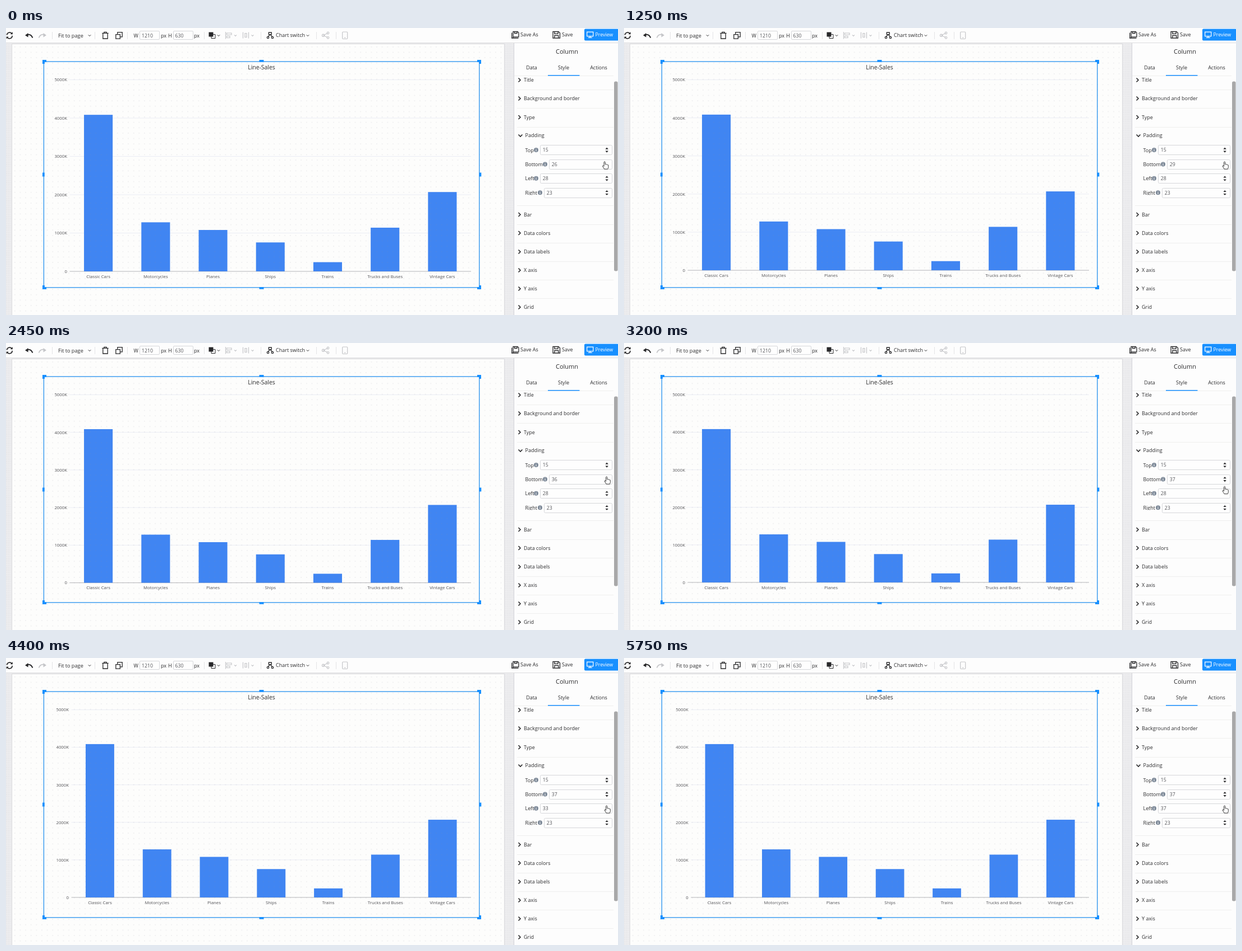
Recreate the animation shown at these times as an HTML page. Size 1091 by 513 pixels, loop 5800 ms.

```html
<!DOCTYPE html>
<html lang="en">
<head>
<meta charset="utf-8">
<title>Chart padding editor</title>
<style>
  html, body { margin: 0; width: 100%; height: 100%; overflow: hidden; background: #fdfdfd; }
  svg { display: block; width: 1091px; height: 513px; font: 9px "Open Sans", "Noto Sans", sans-serif; }
  text { fill: #2c2c2e; }
  .axis { font-size: 7.8px; fill: #535357; }
  .value { font-size: 8.7px; fill: #55565a; }
  .field { fill: #fefefe; stroke: #d6d7da; }
  .icon { fill: none; stroke: #28282a; stroke-width: 1.3; }
  .off { fill: none; stroke: #c5c6c9; stroke-width: 1.2; }
  .rule { stroke: #efefee; }
  .mid { text-anchor: middle; }
  .end { text-anchor: end; }
</style>
</head>
<body>
<svg viewBox="0 0 1091 513" xmlns="http://www.w3.org/2000/svg">
  <defs>
    <pattern id="dots" x="11" y="29" width="9.63" height="9.63" patternUnits="userSpaceOnUse">
      <circle cx="4.8" cy="4.8" r=".65" fill="#8a8a98" fill-opacity=".3"/>
    </pattern>
    <pattern id="mesh" width="3.2" height="3.2" patternUnits="userSpaceOnUse">
      <rect width="3.2" height="3.2" fill="#eeeef0"/>
      <rect width="1.6" height="1.6" fill="#e2e2e5"/>
    </pattern>
    <clipPath id="fold"><path d="M906 200H1091V298.5H906Z"/></clipPath>
  </defs>

  <!-- canvas and page -->
  <rect y="27" width="906" height="486" fill="url(#mesh)"/>
  <rect x="10" y="28" width="879" height="490" fill="#d9d9dc"/>
  <rect x="11" y="29" width="877" height="490" fill="#fdfdfc"/>
  <g id="chart"></g>
  <rect x="11" y="29" width="877" height="490" fill="url(#dots)"/>
  <text class="mid" x="455.5" y="74" style="font-size:10.4px">Line-Sales</text>
  <rect x="67.4" y="60" width="776.4" height="403.9" fill="none" stroke="#2490ee" stroke-width="1.3"/>
  <g id="handles" fill="#1890ff"></g>

  <!-- toolbar -->
  <rect width="1091" height="26.5" fill="#fdfdfd"/>
  <path d="M0 26.5H1091" stroke="#dcdcde"/>
  <g class="icon">
    <path d="M1.6 12.5A4.8 4.8 0 0 1 10 9.6M11 13.7A4.8 4.8 0 0 1 2.4 17" stroke-width="1.7"/>
    <path d="M11.8 7V11.2H7.8ZM.7 19.6V15.4H4.7Z" fill="#28282a" stroke="none"/>
    <path d="M37 12.5Q44 9.5 47.5 17.5" stroke-width="2"/>
    <path d="M34 13L39.5 9V16.5Z" fill="#28282a" stroke="none"/>
    <path d="M171.3 9.3H182.7M174.8 9V7.4H179.2V9M172.8 9.5V19H181.2V9.5"/>
    <path d="M195.8 11.6H203.4V19.2H195.8ZM198.8 11.3V7.6H207.2V15.8H203.6"/>
    <path d="M366 11.5H373V18.5H366Z" stroke-width="1"/>
    <rect x="361.5" y="7.5" width="8" height="8" fill="#28282a" stroke="none"/>
    <path d="M468.3 8H473.3V11.6H468.3ZM470.8 11.6L467.2 15.5M470.8 11.6L474.7 15.5"/>
    <circle cx="467" cy="17" r="1.7"/><circle cx="475" cy="17" r="1.7"/>
    <path d="M904 8.5V18H913.5M904 6.5H912L914 8.5V15.8H904ZM906.5 6.5V9.5H911V6.5M901.7 8.5V18H912"/>
    <path d="M975 6.5H985L987.5 9V18H975ZM977.8 6.5V10.3H984V6.5M977.8 18V13.5H984.8V18"/>
  </g>
  <g class="off">
    <path d="M69 12.5Q62 9.5 58.5 17.5" stroke-width="1.8"/>
    <path d="M72 13L66.5 9V16.5Z" fill="#c5c6c9" stroke="none"/>
    <path d="M391.5 7V19.5M393.5 9H402V12H393.5ZM393.5 14.5H399V17.5H393.5Z"/>
    <path d="M422.5 7.5V18.5M432.5 7.5V18.5M426 9.5H429V16.5H426Z"/>
    <path d="M566 13L573.5 9.3M566 13.3L573.5 17"/>
    <circle cx="565.5" cy="13.2" r="2"/><circle cx="574" cy="9" r="1.8"/><circle cx="574" cy="17.3" r="1.8"/>
    <rect x="599.7" y="7" width="9" height="12.5" rx="1.2"/><path d="M603 17.3H605.5"/>
  </g>
  <path d="M82.5 7V20M158.5 7V20M216.5 7V20M353.5 7V20M454.5 7V20M553.5 7V20M588.5 7V20" stroke="#e4e4e6"/>
  <path id="carets" class="icon" style="stroke-width:1"/>
  <path d="M407 12.3L409 14.3L411 12.3M437.5 12.3L439.5 14.3L441.5 12.3" class="off"/>
  <rect class="field" x="238.5" y="5.5" width="35" height="15" rx="1.5"/>
  <rect class="field" x="298.5" y="5.5" width="35" height="15" rx="1.5"/>
  <text x="93" y="16.5" style="font-size:9.2px">Fit to page</text>
  <text x="227.5" y="16.5">W</text><text class="value" x="242" y="16.5">1210</text><text x="276" y="16.5">px</text>
  <text x="289" y="16.5">H</text><text class="value" x="301.5" y="16.5">630</text><text x="335" y="16.5">px</text>
  <text x="481" y="16.3">Chart switch</text>
  <text x="917" y="15.3">Save As</text>
  <text x="991" y="15.3">Save</text>
  <rect x="1031" y="1.5" width="61" height="21" rx="2" fill="#1890ff"/>
  <path d="M1035.7 7.2H1046.8V14.7H1035.7ZM1041.2 14.7V17M1037.8 17.2H1044.8" fill="none" stroke="#fff" stroke-width="1.2"/>
  <text x="1050.5" y="15.3" style="fill:#fff;font-size:8.8px">Preview</text>

  <!-- side panel -->
  <rect x="905" y="27" width="186" height="486" fill="#fdfdfd"/>
  <path d="M905.5 27V513" stroke="#cfcfd6"/>
  <text class="mid" x="1000" y="46" style="font-size:11px">Column</text>
  <text class="mid" x="937" y="73.7">Data</text>
  <text class="mid" x="994" y="73.7">Style</text>
  <text class="mid" x="1056.5" y="73.7">Actions</text>
  <path class="rule" d="M906 85.5H1083"/>
  <path d="M966 84.8H1022.5" stroke="#1890ff" stroke-width="1.4"/>
  <g id="panel"></g>
  <g id="fields"></g>
  <rect x="1084" y="95.5" width="6.5" height="339" rx="2.5" fill="#a8a8a9"/>

  <path id="cursor" fill="#fff" stroke="#222" stroke-width=".9" stroke-linejoin="round"
    d="M-2.8 2V-5.6Q-1.7 -7.6 -.6 -5.6V-1.4Q.6 -2.4 1.5 -1.1Q2.7 -2 3.4 -.6Q5 -1.1 5 .8V3.4Q5 5.2 3.8 7H-2.2Q-3.2 4.7 -5 2.7Q-6 .9 -4.4 .8Z"/>
</svg>
<script>
const $ = id => document.getElementById(id);
const LOOP = 5800;

function add(parent, tag, attrs, text) {
  const el = document.createElementNS('http://www.w3.org/2000/svg', tag);
  for (const key in attrs) el.setAttribute(key, attrs[key]);
  if (text !== undefined) el.textContent = text;
  return parent.appendChild(el);
}
const set = (el, attrs) => { for (const key in attrs) el.setAttribute(key, attrs[key]); };

// Static repeats
$('carets').setAttribute('d', [149, 379, 538].map(x => `M${x - 2.2} 12.3l2.2 2.2l2.2 -2.2`).join(''));

for (const [x, sx] of [[65, 1], [847, -1]])
  for (const [y, sy] of [[57, 1], [467, -1]])
    add($('handles'), 'path', { d: 'M0 0H7V4H4V7H0Z', transform: `translate(${x} ${y}) scale(${sx} ${sy})` });
for (const [x, y, w, h] of [[451.5, 57, 8, 3.8], [451.5, 463, 8, 3.8], [65, 258.5, 3.8, 7], [843.5, 258.5, 3.8, 7]])
  add($('handles'), 'rect', { x, y, width: w, height: h });

const sections = [['Title', 93], ['Background and border', 126], ['Type', 159.5], ['Padding', 192], ['Bar', 333.5],
  ['Data colors', 366.5], ['Data labels', 400], ['X axis', 433], ['Y axis', 466], ['Grid', 499]];
for (const [name, y] of sections) {
  const open = name === 'Padding';
  add($('panel'), 'path', {
    d: open ? `M913.5 ${y - 1.5}l3.5 3.5l3.5 -3.5` : `M913.5 ${y - 3.5}l3.5 3.5l-3.5 3.5`,
    class: 'icon', style: 'stroke-width:1.6'
  });
  add($('panel'), 'text', { x: open ? 925.5 : 923, y: y + 3.2 }, name);
  add($('panel'), 'path', { class: 'rule', d: `M911 ${open ? 317.5 : Math.round(y + 17) + .5}H1083` });
}

const rows = [['Top', 218.2, 952.5, 15], ['Bottom', 243.7, 968.5, 26], ['Left', 269, 952.5, 28], ['Right', 294.5, 959.5, 23]];
const fields = rows.map(([name, y, x, value]) => {
  const g = $('fields');
  add(g, 'text', { x: 925.5, y: y + 3.4, 'clip-path': 'url(#fold)' }, name);
  add(g, 'circle', { cx: x - 7.5, cy: y - .3, r: 4, fill: '#7d8998' });
  add(g, 'path', { d: `M${x - 7.5} ${y - 2.8}v1.1m0 1v3`, stroke: '#fff', 'stroke-width': 1.1 });
  add(g, 'rect', { class: 'field', x, y: Math.round(y - 9) + .5, width: 1080.5 - x, height: 17, rx: 2 });
  return {
    y,
    arrows: add(g, 'path', { d: `M1068.4 ${y - 1.4}h5.4l-2.7 -3.2zM1068.4 ${y + 1.4}h5.4l-2.7 3.2z`, fill: '#2a2a2c' }),
    value: add(g, 'text', { class: 'value', x: x + 4.3, y: y + 3.2 }, value)
  };
});

// Chart
const TOP = 92.5, RIGHT = 829, SCALE = .642;
const sales = [['Classic Cars', 4085], ['Motorcycles', 1280], ['Planes', 1080], ['Ships', 755],
  ['Trains', 240], ['Trucks and Buses', 1140], ['Vintage Cars', 2070]];
const ticks = [0, 1, 2, 3, 4, 5].map(n => ({
  n,
  line: add($('chart'), 'path', { stroke: n ? '#ebedf4' : '#b3b4b8' }),
  label: add($('chart'), 'text', { class: 'axis end' }, n ? n + '000K' : '0')
}));
const bars = sales.map(([name, amount]) => ({
  amount,
  bar: add($('chart'), 'rect', { fill: '#4085f2' }),
  label: add($('chart'), 'text', { class: 'axis mid' }, name)
}));

function drawChart(bottom, left) {
  const base = 435 - (bottom - 26) * SCALE;
  const x0 = 113.5 + (left - 28) * SCALE;
  const unit = (base - TOP) / 5000, band = (RIGHT - x0) / 7;
  for (const { n, line, label } of ticks) {
    const y = base - n * 1000 * unit;
    set(line, { d: `M${x0} ${y}H${RIGHT}` });
    set(label, { x: x0 - 4.5, y: y + 2.9 });
  }
  bars.forEach(({ amount, bar, label }, i) => {
    const mid = x0 + (i + .5) * band, h = amount * unit;
    set(bar, { x: mid - band / 4, y: base - h, width: band / 2, height: h });
    set(label, { x: mid, y: base + 11.8 });
  });
}

// Times of the clicks on each spinner
const run = (start, gap, count) => Array.from({ length: count }, (_, i) => start + i * gap);
const bottomClicks = [620, 850, 1040, ...run(1290, 160, 7), 2520];
const leftClicks = [3650, 3800, ...run(3960, 160, 6), 5000];

const clamp = v => Math.min(1, Math.max(0, v));
const ease = v => (v = clamp(v), v * v * (3 - 2 * v));
const count = (clicks, t) => clicks.filter(c => c <= t).length;
const glide = (clicks, t) => clicks.reduce((sum, c) => sum + ease((t - c) / 180), 0);

function draw(t) {
  fields[1].value.textContent = 26 + count(bottomClicks, t);
  fields[2].value.textContent = 28 + count(leftClicks, t);
  drawChart(26 + glide(bottomClicks, t), 28 + glide(leftClicks, t));
  const x = 1068.8 + 3.5 * ease((t - 100) / 350);
  const y = 245.2 + 25 * ease((t - 2850) / 550);
  set($('cursor'), { transform: `translate(${x} ${y})` });
  // The hovered spinner shows no arrows beside the pointer
  for (const f of fields) set(f.arrows, { visibility: Math.abs(f.y - y) < 9 ? 'hidden' : 'visible' });
}

function tick() {
  draw(performance.now() % LOOP);
  requestAnimationFrame(tick);
}
tick();
</script>
</body>
</html>
```
